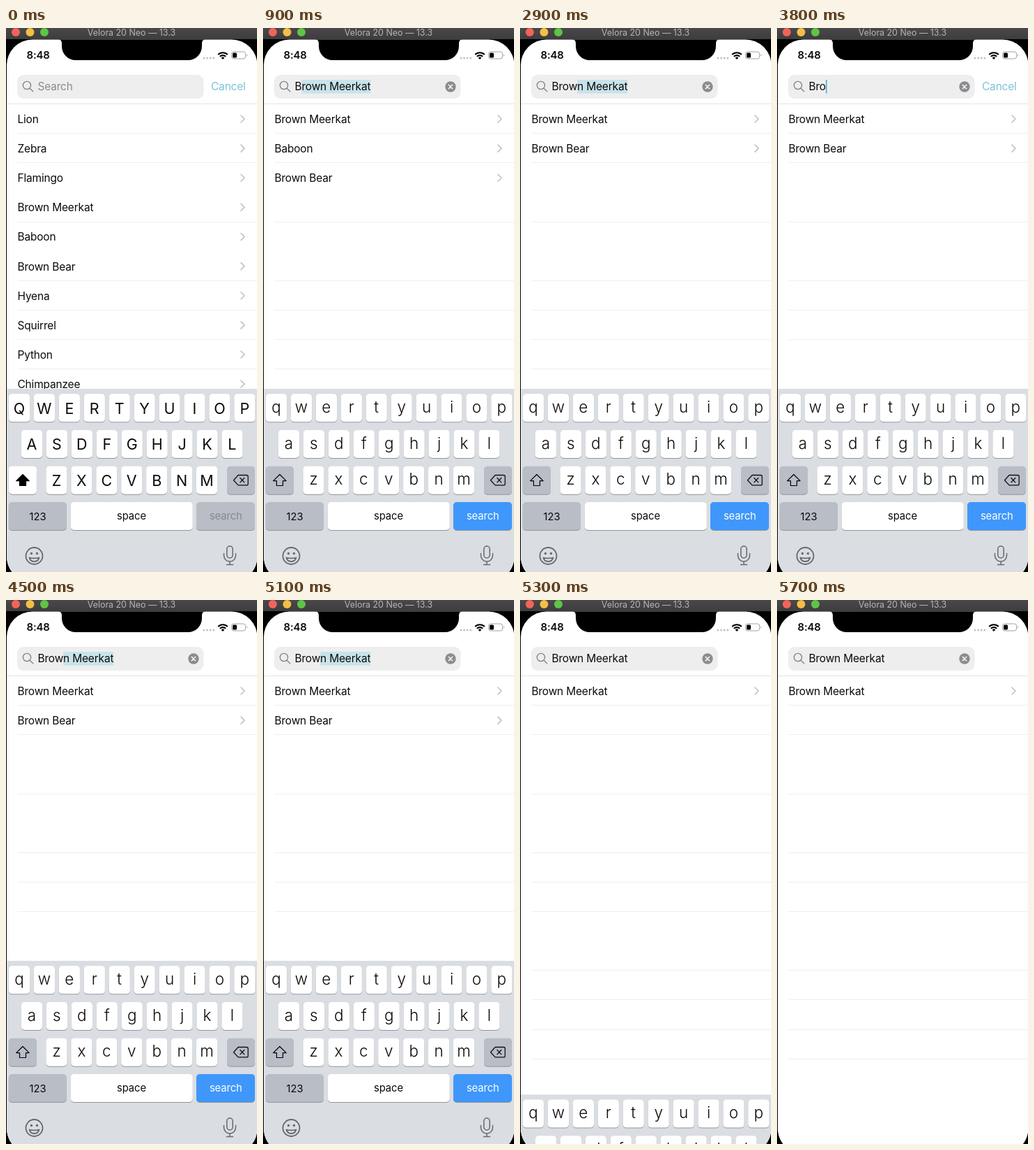
An HTML page that plays this animation: 360x778 px, repeating every 5.8 s.

```html
<!DOCTYPE html>
<html lang="en">
<head>
<meta charset="utf-8">
<title>Animal search</title>
<style>
  html, body { margin: 0; width: 100%; height: 100%; overflow: hidden; background: #000; }
  svg { display: block; width: 360px; height: 778px; }
  text { font: 15.5px Inter, Roboto, sans-serif; letter-spacing: -.2px; fill: #0b0b0b; white-space: pre; }
  .mid { text-anchor: middle; }
  .title { font-size: 12.5px; letter-spacing: -.05px; fill: #b5b3b5; }
  .clock { font-size: 15px; font-weight: 600; }
  .hint { fill: #8b8b8f; }
  .cancel { fill: #7bc3d6; }
  .upper { font-size: 21.5px; letter-spacing: 0; }
  .lower { font-size: 22.5px; font-weight: 350; letter-spacing: 0; }
  .small { font-size: 14.8px; letter-spacing: -.1px; }
  .line { fill: none; stroke-linecap: round; stroke-linejoin: round; }
</style>
</head>
<body>
<svg viewBox="0 0 360 778">
  <defs>
    <clipPath id="screen"><rect x="1" y="16.5" width="359.5" height="776" rx="37"/></clipPath>
    <linearGradient id="bar" x2="0" y2="1"><stop stop-color="#4a484a"/><stop offset="1" stop-color="#3e3c3e"/></linearGradient>
  </defs>
  <rect width="360" height="778"/>
  <rect width="360" height="16" fill="url(#bar)"/>
  <circle cx="14" cy="6" r="6" fill="#f2635a"/>
  <circle cx="34.5" cy="6" r="6" fill="#f5be45"/>
  <circle cx="55" cy="6" r="6" fill="#5dc545"/>
  <text class="title mid" x="180" y="11">Velora 20 Neo — 13.3</text>

  <g clip-path="url(#screen)">
    <rect y="16" width="361" height="762" fill="#fff"/>
    <path d="M74 16q6 0 6 6v4a20 20 0 0 0 20 20h161a20 20 0 0 0 20-20v-4q0-6 6-6z"/>
    <text class="clock" x="29.5" y="44.3">8:48</text>
    <g fill="#c3c3c5">
      <circle cx="284" cy="43" r="1.5"/><circle cx="288.6" cy="43" r="1.5"/>
      <circle cx="293.2" cy="43" r="1.5"/><circle cx="297.8" cy="43" r="1.5"/>
    </g>
    <path d="M304.2 38a9.6 9.6 0 0 1 13.6 0M306.8 40.8a6 6 0 0 1 8.4 0" fill="none" stroke="#000" stroke-width="2.1"/>
    <path d="M308.6 42.6a3.4 3.4 0 0 1 4.8 0L311 45z"/>
    <rect x="323.5" y="34" width="20" height="10" rx="3" fill="none" stroke="#a0a0a2"/>
    <path d="M345 37.3q2 1.7 0 3.4z" fill="#a0a0a2"/>
    <rect x="325" y="35.5" width="6" height="7" rx="1.5"/>

    <rect x="16" y="67" width="267.5" height="34" rx="9" fill="#eeeeef"/>
    <g class="line" stroke="#858589" stroke-width="1.4"><circle cx="30" cy="82" r="5.6"/><path d="M34.2 86.2l4.6 4.6"/></g>
    <rect id="mark" y="74" height="19.5"/>
    <text id="field" x="45.5" y="89.3"></text>
    <g id="clear">
      <circle cx="269" cy="84" r="7.7" fill="#8c8c90"/>
      <path class="line" d="M266.3 81.3l5.4 5.4m0-5.4l-5.4 5.4" stroke="#fff" stroke-width="1.4"/>
    </g>
    <text id="cancel" class="cancel" x="294" y="89.3">Cancel</text>
    <rect y="108" width="361" height="1" fill="#e4e4e5"/>
    <g id="lines" fill="#efeff0"></g>
    <g id="list"></g>

    <g id="keyboard">
      <rect y="516" width="361" height="262" fill="#dadde1"/>
      <g id="keys"></g>
      <g class="line" stroke="#666a70" stroke-width="1.8">
        <circle cx="40.5" cy="755" r="12"/>
        <path d="M33.5 757.5q7 1.8 14 0a7.2 7.2 0 0 1-14 0z"/>
        <rect x="316.8" y="741" width="8.4" height="17" rx="4.2" stroke-width="1.5"/>
        <path d="M312.5 751.5v3a8.5 8.5 0 0 0 17 0v-3M321 763v4.5m-4.5 0h9" stroke-width="1.5"/>
      </g>
      <circle cx="36.5" cy="751.5" r="1.7" fill="#666a70"/>
      <circle cx="44.5" cy="751.5" r="1.7" fill="#666a70"/>
    </g>
  </g>
</svg>
<script>
const LOOP = 5800, ROW = 42.12;
const $ = id => document.getElementById(id);

function add(parent, tag, attrs, text) {
  const el = document.createElementNS('http://www.w3.org/2000/svg', tag);
  for (const name in attrs) el.setAttribute(name, attrs[name]);
  if (text) el.textContent = text;
  return parent.appendChild(el);
}
const show = (el, on) => el.setAttribute('visibility', on ? 'inherit' : 'hidden');

// Keyboard
const keys = $('keys'), letters = [];
function key(x, y, w, fill) {
  add(keys, 'rect', { x, y: y + 1, width: w, height: 40, rx: 4.8, fill: '#93969b' });
  return add(keys, 'rect', { x, y, width: w, height: 40, rx: 4.8, fill });
}
function label(x, y, text) {
  return add(keys, 'text', { x, y, class: 'small mid' }, text);
}
[['qwertyuiop', 3.9], ['asdfghjkl', 21.9], ['zxcvbnm', 57.4]].forEach(([row, left], r) => {
  [...row].forEach((ch, i) => {
    const x = left + i * 35.93, y = 523.3 + r * 51.7;
    key(x, y, 30.2, '#fff');
    letters.push({ ch, y, el: add(keys, 'text', { x: x + 15.1, class: 'mid' }) });
  });
});
const GREY = '#b8bdc6', BLUE = '#3f97fb';
const shift = key(3.9, 626.7, 40, GREY);
const arrow = add(keys, 'path', {
  d: 'M24 638.5l9.2 9.2h-4.7v6.8h-9v-6.8h-4.7z', class: 'line', stroke: '#000', 'stroke-width': 1.2
});
key(317, 626.7, 40, GREY);
add(keys, 'path', {
  d: 'M333 639.5h12q2.2 0 2.2 2.2v10q0 2.2-2.2 2.2h-12l-6.5-7.2zM335.8 643.5l6 6.4m0-6.4l-6 6.4',
  class: 'line', stroke: '#111', 'stroke-width': 1.3
});
key(3.9, 678, 83, GREY);
label(45.5, 703.6, '123');
key(92.8, 678, 175, '#fff');
label(180, 703, 'space');
const go = key(273, 678, 84, GREY), goText = label(315.3, 703, 'search');

function setCaps(caps) {
  for (const { ch, y, el } of letters) {
    el.textContent = caps ? ch.toUpperCase() : ch;
    el.setAttribute('class', 'mid ' + (caps ? 'upper' : 'lower'));
    el.setAttribute('y', y + (caps ? 28.3 : 26.6));
  }
  shift.setAttribute('fill', caps ? '#fff' : GREY);
  arrow.style.fill = caps ? '#000' : 'none';
  go.setAttribute('fill', caps ? GREY : BLUE);
  goText.style.fill = caps ? '#858a92' : '#fff';
}

// List
const animals = ['Lion', 'Zebra', 'Flamingo', 'Brown Meerkat', 'Baboon', 'Brown Bear',
  'Hyena', 'Squirrel', 'Python', 'Chimpanzee'];
const rules = [0, 1, 3, 5, 6, 7, 8, 9, 10, 11, 12].map(i =>
  add($('lines'), 'rect', { x: 16.5, y: Math.round(150.18 + i * ROW), width: 344, height: 1 }));

function setList(prefix) {
  $('list').textContent = '';
  animals.filter(name => name.startsWith(prefix)).forEach((name, i) => {
    const y = 130 + i * ROW;
    add($('list'), 'text', { x: 16.5, y: y + 6 }, name);
    add($('list'), 'path', {
      d: `M337 ${y - 5}l5 5-5 5`, class: 'line', stroke: '#c2c2c5', 'stroke-width': 1.6
    });
  });
}

// Search field: time, typed text, suggested rest
const PICK = 'Brown Meerkat';
const steps = [
  [0, '', ''], [100, 'B', 'rown Meerkat'], [1100, 'Br', 'own Meerkat'], [2000, 'Bro', 'wn Meerkat'],
  [2600, 'Brow', 'n Meerkat'], [3100, 'Brow', ''], [3700, 'Bro', ''], [4000, 'Brow', 'n Meerkat'],
  [5200, PICK, '']
];

function setStep([time, typed, rest]) {
  const field = $('field'), mark = $('mark'), editing = !rest && typed !== PICK;
  field.textContent = typed + rest || 'Search';
  field.setAttribute('class', typed ? '' : 'hint');
  const x = typed ? 45.5 + field.getSubStringLength(0, typed.length) : 0;
  const width = rest ? field.getComputedTextLength() + 45.5 - x : 1.8;
  mark.setAttribute('x', x);
  mark.setAttribute('width', width);
  mark.setAttribute('fill', rest ? '#c8e3ea' : '#5fb4c8');
  show(mark, rest || (typed && editing));
  show($('clear'), typed);
  show($('cancel'), editing);
  show(rules[6], time < 3100);
  setCaps(!typed);
  setList(typed);
}

// Critically damped spring, as the keyboard leaves
function slide(t) {
  if (t < 5200) return 0;
  if (t >= 5500) return 264;
  const k = (t - 5156.3) * 0.018;
  return 262 * (1 - (1 + k) * Math.exp(-k));
}

let current;
function draw(now) {
  const t = Math.floor(now % LOOP / 100) * 100;
  const step = steps.filter(s => s[0] <= t).pop();
  if (step !== current) setStep(current = step);
  $('keyboard').setAttribute('transform', `translate(0 ${slide(t)})`);
}

const start = performance.now();
function tick() {
  draw(performance.now() - start);
  requestAnimationFrame(tick);
}
tick();
</script>
</body>
</html>
```
